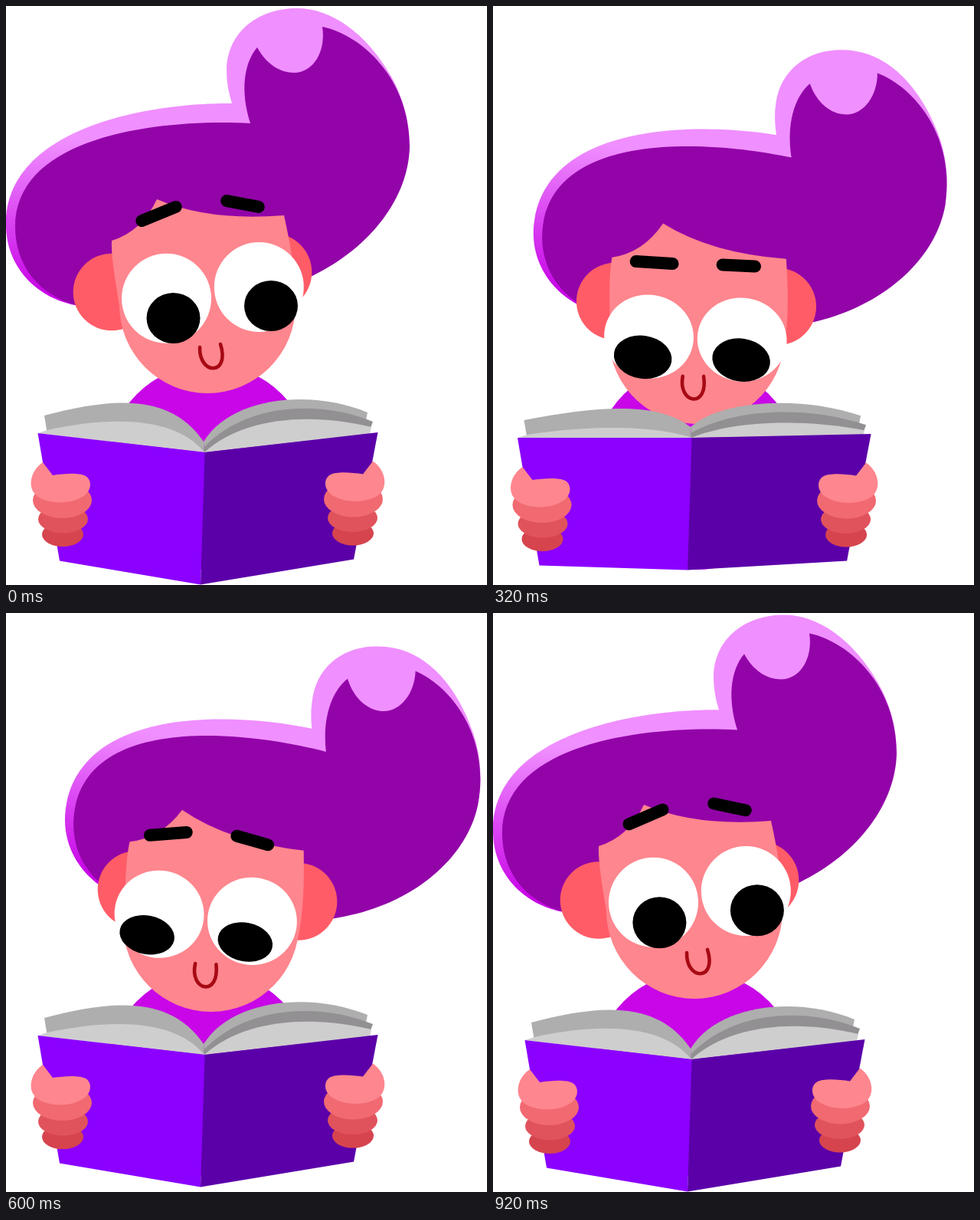
These frames come from a looping animation (628 px wide and 755 px high, 960 ms). An HTML page with a canvas:

```html
<!DOCTYPE html>
<html lang="en">
<head>
<meta charset="utf-8">
<title>Reading</title>
<style>
html, body { margin: 0; width: 628px; height: 755px; overflow: hidden; background: #fff; }
canvas { display: block; }
</style>
</head>
<body>
<canvas id="stage" width="628" height="755"></canvas>
<script>
const ctx = document.getElementById('stage').getContext('2d');
const LOOP = 960, STEP = 40, RAD = Math.PI / 180;

// Timing helpers: a cosine ramp from 0 to 1, and a smooth bump 0-1-0.
const progress = (t, from, to) => Math.min(1, Math.max(0, (t - from) / (to - from)));
const ramp = (t, from, to) => (1 - Math.cos(Math.PI * progress(t, from, to))) / 2;
const bump = (t, from, to) => Math.sin(Math.PI * progress(t, from, to)) ** 2;

// Everything that moves is driven by these few signals.
function poseAt(t) {
  const nod = bump(t, 0, 560);
  return {
    nod,
    hop: -10 * Math.sin(Math.PI * progress(t, 560, 760)),
    dip: 42 * nod + 15 * bump(t, 400, 800),
    lift: 14 * bump(t, 640, 960),
    tilt: 12.1 * (ramp(t, 0, 490) - ramp(t, 560, 800)) * RAD,
    sway: ramp(t, 0, 560) - ramp(t, 560, 810)
  };
}

const SKIN = '#fe868e', EAR = '#ff5c67';
const hairBack = new Path2D('M295,127 Q288,105 288,85 C288,35 328,3 380,3 C425,3 470,35 503,92 C518,118 527,150 527,183 L319,300 L95,391 C40,382 0,340 0,285 C0,157 190,126 295,127Z');
const hairFront = new Path2D('M319,153 C306,112 310,75 328,54 C340,76 358,87 376,87 C402,87 418,58 413,27 C465,38 527,95 527,183 C526,248 478,314 400,352 Q370,366 340,375 L120,395 L95,391 C40,377 12,335 12,288 C12,165 212,147 319,153Z');
const face = new Path2D('M138,306 Q177,294 197,252 Q265,281 363,273 C371,310 379,350 378,390 A115,115 0 0 1 148,390 C145,370 137,330 138,306Z');
const nose = new Path2D('M253,445 C252,482 293,482 280,441');
const thumb = new Path2D('M48,595 C33,605 29,624 36,634 C45,649 80,651 96,642 C113,635 113,618 104,613 C95,608 75,610 61,612Z');
const hairShade = ctx.createLinearGradient(0, 175, 0, 370);
hairShade.addColorStop(0, '#f08fff');
hairShade.addColorStop(1, '#c806e7');

function fill(color, path) {
  ctx.fillStyle = color;
  ctx.fill(path);
}
function ellipse(color, x, y, rx, ry = rx) {
  ctx.fillStyle = color;
  ctx.beginPath();
  ctx.ellipse(x, y, rx, ry, 0, 0, 7);
  ctx.fill();
}
function brow(x, y, half, angle) {
  const dx = half * Math.cos(angle * RAD), dy = half * Math.sin(angle * RAD);
  ctx.lineWidth = 16;
  ctx.strokeStyle = '#000';
  ctx.beginPath();
  ctx.moveTo(x - dx, y - dy);
  ctx.lineTo(x + dx, y + dy);
  ctx.stroke();
}

function drawHead({ dip, lift, tilt, sway, hop }) {
  // Each layer turns with the head and slides by its own depth.
  const layer = (slide, down, up, draw) => {
    ctx.save();
    ctx.translate(263 + (5 + slide) * sway, 390 + (1 + down) * dip - (1 + up) * lift);
    ctx.rotate(tilt);
    ctx.translate(-263, -390);
    draw();
    ctx.restore();
  };
  const frown = 0.42 * dip - 0.5 * lift;
  const eyeH = 58.5 - 0.1 * dip;
  const pupilW = 35 + 0.075 * dip;
  const pupilH = 33 - 0.125 * dip + 0.28 * lift + hop;
  ctx.lineCap = 'round';

  layer(52, -0.17, -0.7, () => {
    fill(hairShade, hairBack);
    fill('#9204a8', hairFront);
  });
  layer(23, -0.22, -1.75, () => {
    ellipse(EAR, 138, 373, 50.3);
    ellipse(EAR, 349, 347, 50.3);
  });
  layer(0, 0, 0, () => fill(SKIN, face));
  layer(-18, 0.45, 0.95, () => {
    ellipse('#fff', 209.5, 381.3, 58.5, eyeH);
    ellipse('#fff', 330.3, 366.5, 58.5, eyeH);
  });
  layer(-39, 0.45, 0.6, () => {
    const glance = -0.55 * lift;
    ellipse('#000', 218.5 + glance, 407, pupilW, pupilH);
    ellipse('#000', 346 + glance, 391, pupilW, pupilH);
  });
  layer(-18, 0.8, 1.5, () => {
    brow(199.5, 271, 24, -22.2 + frown);
    brow(309, 258, 21.2, 10.8 - frown);
  });
  layer(0, 0, 0, () => {
    ctx.lineWidth = 4.6;
    ctx.strokeStyle = '#a70a14';
    ctx.stroke(nose);
  });
}

function drawHand() {
  ellipse('#d6444e', 74, 689, 27, 16);
  ellipse('#e0535c', 74.5, 669, 32.5, 18.5);
  ellipse('#f16971', 73.5, 644.5, 38.5, 23.5);
  fill(SKIN, thumb);
}

function drawBook({ nod, hop }) {
  const sink = 9 * nod * nod;
  const spine = y => y - 20 * nod;
  const lx = x => x - 10 * nod, rx = x => x + 8.5 * nod;
  const ly = y => y + sink - 2.2 * nod, ry = y => y + sink - 6.5 * nod;
  const edge = y => y + sink - 4 * nod;
  const lc = y => y + sink + 3 * nod, rc = y => y + sink - 1.5 * nod;
  const shape = (color, d) => fill(color, new Path2D(d));

  ctx.save();
  ctx.translate(0, hop);
  shape('#aeaeae', `M${lx(50)},${ly(534)} C140,${lc(510)} 215,${lc(505)} 258,${spine(568)} L259,${spine(582)} L${lx(54)},${ly(558)}Z`);
  shape('#cecece', `M${lx(42)},${ly(557)} L${lx(54)},${ly(553)} C150,${lc(532)} 225,${lc(540)} 259,${spine(582)}Z`);
  shape('#aeaeae', `M258,${spine(568)} C295,${rc(508)} 400,${rc(500)} ${rx(472)},${edge(530)} L${rx(470)},${edge(540)} L259,${spine(582)}Z`);
  shape('#929092', `M258,${spine(576)} C310,${rc(520)} 405,${rc(512)} ${rx(479)},${edge(542)} L${rx(476)},${edge(550)} L259,${spine(582)}Z`);
  shape('#cecece', `M259,${spine(582)} C310,${rc(535)} 400,${rc(530)} ${rx(477)},${edge(549)} L${rx(475)},${ry(558)}Z`);
  shape('#8b00ff', `M${lx(41.5)},${ly(557)} L260,${spine(582)} L254,${spine(754.5)} L${lx(70)},${ly(723.5)}Z`);
  shape('#5b00a9', `M259.5,${spine(582)} L${rx(485.5)},${ry(556)} L${rx(454)},${ry(721.5)} L254,${spine(754.5)}Z`);

  ctx.save();
  ctx.translate(lx(0), ly(0));
  drawHand();
  ctx.restore();
  ctx.translate(rx(527), ry(-1.5));
  ctx.scale(-1, 1);
  drawHand();
  ctx.restore();
}

function frame(now) {
  const pose = poseAt(Math.floor(now % LOOP / STEP) * STEP);
  ctx.fillStyle = '#fff';
  ctx.fillRect(0, 0, 628, 755);
  ellipse('#c806e7', 265.5, 601, 134);
  drawHead(pose);
  drawBook(pose);
  requestAnimationFrame(frame);
}
frame(0);
</script>
</body>
</html>
```
